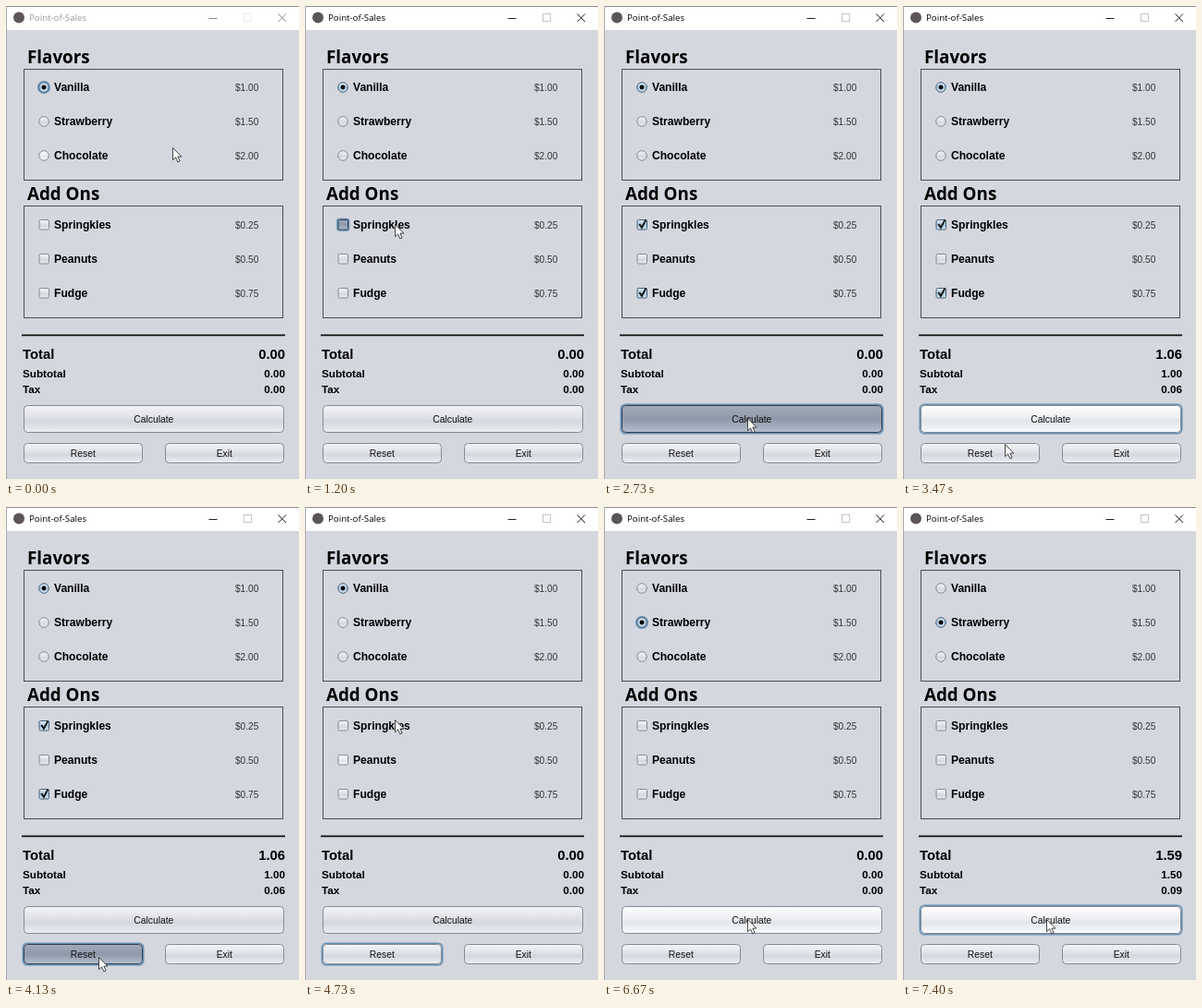
These frames come from a looping animation (317x512 px, 8 s). An HTML page:

```html
<!DOCTYPE html>
<html lang="en">
<head>
<meta charset="utf-8">
<title>Point-of-Sales</title>
<style>
html, body { margin: 0; width: 100%; height: 100%; overflow: hidden; background: #d4d7de; }
svg { display: block; }
text { font-family: "Liberation Sans", Arial, sans-serif; fill: #000; }
.title { font: 9.7px "Open Sans", sans-serif; }
.heading { font: 700 18.8px "Open Sans", sans-serif; }
.label { font-size: 12.1px; font-weight: 700; }
.price { font-size: 10.1px; fill: #333; }
.total { font-size: 14.8px; font-weight: 700; }
.sum { font-size: 11.7px; font-weight: 700; }
.caption { font-size: 10.3px; text-anchor: middle; fill: #111; }
.end { text-anchor: end; }
.frame { fill: none; stroke: #4b4d52; }
.chrome { fill: none; stroke: #222; }
.disabled { stroke: #c4c4c4; }
.inactive .title { fill: #999; }
.inactive .chrome { stroke: #8c8c8c; }
.inactive .disabled { stroke: #ececec; }

.face { fill: url(#normal); stroke: #858a94; }
.hover .face { fill: url(#light); }
.selected .face { fill: url(#blue); stroke: #46607a; }
.pressed .face { fill: url(#dark); stroke: #333f55; }
.ring { fill: none; stroke: #6591b3; stroke-width: 1.6; visibility: hidden; }
.focus .ring { visibility: visible; }
.mark { visibility: hidden; }
.selected .mark { visibility: visible; }
.tick { fill: none; stroke: #111; stroke-width: 1.9; }
</style>
</head>
<body>
<svg id="stage" width="317" height="512" viewBox="0 0 317 512">
  <defs>
    <linearGradient id="normal" x2="0" y2="1">
      <stop stop-color="#f4f5f7"/><stop offset=".45" stop-color="#dfe1e6"/>
      <stop offset=".58" stop-color="#d4d7dd"/><stop offset="1" stop-color="#eaedf1"/>
    </linearGradient>
    <linearGradient id="light" x2="0" y2="1">
      <stop stop-color="#fff"/><stop offset=".45" stop-color="#eceef1"/>
      <stop offset=".58" stop-color="#e2e5ea"/><stop offset="1" stop-color="#f8fafc"/>
    </linearGradient>
    <linearGradient id="blue" x2="0" y2="1">
      <stop stop-color="#e3edf5"/><stop offset=".5" stop-color="#a9c4da"/>
      <stop offset="1" stop-color="#d3e6f4"/>
    </linearGradient>
    <linearGradient id="dark" x2="0" y2="1">
      <stop stop-color="#a3abb9"/><stop offset=".5" stop-color="#8f99aa"/>
      <stop offset="1" stop-color="#b3bdcc"/>
    </linearGradient>
  </defs>
  <rect width="317" height="512" fill="#d4d7de"/>
  <rect width="317" height="26" fill="#fff"/>
  <path d="M0 .5H317" stroke="#8d8d92"/>
  <path d="M.5 0V512" stroke="#aaa6b0"/>
  <circle cx="14" cy="12.5" r="6" fill="#5c5756"/>
  <text class="title" x="25" y="16.3">Point-of-Sales</text>
  <path class="chrome" d="M219.5 13.5h9M294.5 8.5l8.5 8.5m0-8.5l-8.5 8.5"/>
  <rect class="chrome disabled" x="257.5" y="8.5" width="8" height="8"/>

  <text class="heading" x="23" y="62">Flavors</text>
  <rect class="frame" x="19.5" y="68.5" width="280" height="120"/>
  <text class="heading" x="23" y="210.3">Add Ons</text>
  <rect class="frame" x="19.5" y="216.5" width="280" height="121"/>
  <g id="controls"></g>

  <path d="M17 356.4H302" stroke="#111" stroke-width="1.6"/>
  <text class="total" x="18" y="382.3">Total</text>
  <text class="total end" id="total" x="302" y="382.3"></text>
  <text class="sum" x="18" y="402.3">Subtotal</text>
  <text class="sum end" id="subtotal" x="302" y="402.3"></text>
  <text class="sum" x="18" y="418.6">Tax</text>
  <text class="sum end" id="tax" x="302" y="418.6"></text>
  <path id="cursor" d="M0 0V13.2L3.1 10.4L5.3 15.4L7.6 14.4L5.4 9.6H9.4Z"
    fill="#fff" stroke="#333" stroke-width=".9"/>
</svg>
<script>
const LOOP = 8000, STEP = 1000 / 15;
const $ = id => document.getElementById(id);

const options = [
  ['Vanilla', 88, 1, 'radio'], ['Strawberry', 125, 1.5, 'radio'], ['Chocolate', 162, 2, 'radio'],
  ['Springkles', 237, .25, 'check'], ['Peanuts', 274, .5, 'check'], ['Fudge', 311, .75, 'check']
].map(([name, y, price, type]) => ({ name, y, price, type, box: [30, y - 12, 175, 24] }));

const buttons = [
  ['Calculate', 19, 432, 281, 29], ['Reset', 19, 473, 128, 21], ['Exit', 172, 473, 128, 21]
].map(([name, ...box]) => ({ name, box, type: 'button' }));

const controls = [...options, ...buttons];

// [press step, release step, control]
const clicks = [
  [18, 20, 'Springkles'], [28, 30, 'Fudge'], [40, 42, 'Calculate'],
  [61, 63, 'Reset'], [80, 82, 'Strawberry'], [110, 111, 'Calculate']
];

// [step, x, y]
const path = [
  [9, 180, 153], [13, 150, 190], [16, 100, 234], [17, 97, 236], [19, 97, 236],
  [22, 84, 269], [24, 86, 305], [25, 86, 313], [30, 86, 313], [33, 112, 372],
  [36, 155, 437], [38, 155, 446], [47, 155, 446], [51, 118, 460], [52, 110, 474],
  [56, 100, 487], [63, 100, 487], [67, 98, 380], [70, 97, 262], [71, 97, 230],
  [73, 96, 192], [77, 92, 150], [79, 88, 128], [87, 88, 128], [90, 88, 158],
  [91, 90, 173], [96, 125, 350], [99, 153, 440], [100, 155, 446]
];

function optionMarkup({ name, y, price, type }) {
  const shape = type === 'radio'
    ? `<circle class="ring" cx="41" cy="${y}" r="6.2"/><circle class="face" cx="41" cy="${y}" r="5.3"/>
       <circle class="mark" cx="41" cy="${y}" r="2.4"/>`
    : `<rect class="ring" x="35" y="${y - 6.5}" width="12.5" height="12.5" rx="2"/>
       <rect class="face" x="36" y="${y - 5.5}" width="10.5" height="10.5" rx="1.5"/>
       <path class="mark tick" d="M38.3 ${y - 1}l2.6 4l4.6 -8.6"/>`;
  return `<g id="${name}">${shape}<text class="label" x="52" y="${y + 4.4}">${name}</text>
    <text class="price" x="248" y="${y + 3.6}">$${price.toFixed(2)}</text></g>`;
}

function buttonMarkup({ name, box: [x, y, w, h] }) {
  return `<g id="${name}"><rect class="ring" x="${x - .7}" y="${y - .7}" width="${w + 2.4}" height="${h + 2.4}" rx="4.5"/>
    <rect class="face" x="${x + .5}" y="${y + .5}" width="${w}" height="${h}" rx="4"/>
    <text class="caption" x="${x + w / 2 + .3}" y="${y + h / 2 + 4.4}">${name}</text></g>`;
}

$('controls').innerHTML = options.map(optionMarkup).join('') + buttons.map(buttonMarkup).join('');

function cursorAt(step) {
  const next = path.findIndex(p => p[0] > step);
  if (next < 1) return (next ? path[path.length - 1] : path[0]).slice(1);
  const [k0, x0, y0] = path[next - 1], [k1, x1, y1] = path[next];
  const f = (step - k0) / (k1 - k0);
  return [x0 + (x1 - x0) * f, y0 + (y1 - y0) * f];
}

function stateAt(step) {
  const state = { flavor: 'Vanilla', addOns: new Set(), focus: 'Vanilla', pressed: '', subtotal: 0 };
  for (const [down, up, name] of clicks) {
    if (step < down) break;
    state.focus = name;
    if (step < up) { state.pressed = name; break; }
    const { type } = controls.find(c => c.name === name);
    if (type === 'radio') state.flavor = name;
    if (type === 'check') state.addOns.add(name);
    if (name === 'Calculate') state.subtotal = options.find(o => o.name === state.flavor).price;
    if (name === 'Reset') { state.addOns.clear(); state.subtotal = 0; }
  }
  return state;
}

function draw(step) {
  const state = stateAt(step);
  const [hx, hy] = cursorAt(step - 1); // hover trails the pointer by one step
  for (const { name, box: [x, y, w, h] } of controls) {
    const css = $(name).classList;
    css.toggle('focus', state.focus === name);
    css.toggle('pressed', state.pressed === name);
    css.toggle('selected', state.flavor === name || state.addOns.has(name));
    css.toggle('hover', hx >= x && hx <= x + w && hy >= y && hy <= y + h);
  }
  const tax = Math.round(state.subtotal * 6) / 100;
  $('subtotal').textContent = state.subtotal.toFixed(2);
  $('tax').textContent = tax.toFixed(2);
  $('total').textContent = (state.subtotal + tax).toFixed(2);
  $('stage').classList.toggle('inactive', step < clicks[0][0]);
  $('cursor').setAttribute('transform', `translate(${cursorAt(step).map(v => Math.round(v) + .5)})`);
}

const start = performance.now();
function tick() {
  const time = (performance.now() - start) % LOOP;
  draw(Math.floor((time + 4) / STEP));
  requestAnimationFrame(tick);
}
tick();
</script>
</body>
</html>
```
